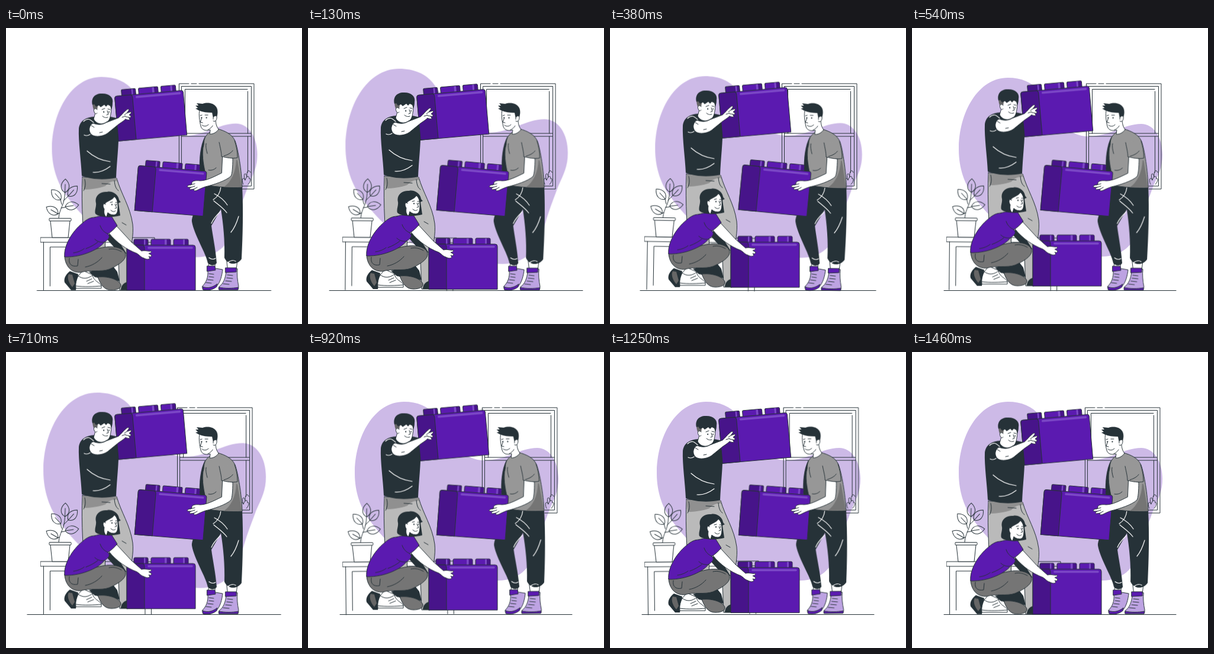
Animation, 500 px wide and 500 px high, one loop 1500 ms. Source, as an HTML page:

```html
<!DOCTYPE html>
<html lang="en">
<head>
<meta charset="utf-8">
<title>Building together</title>
<style>
  html, body { margin: 0; width: 100%; height: 100%; overflow: hidden; background: #fff; }
  svg { display: block; width: 100vw; height: 100vh; }
  svg * { transform-box: view-box; }
  .ink { fill: none; stroke: #263238; stroke-width: 1; stroke-linecap: round; stroke-linejoin: round; }
  .chalk { fill: none; stroke: #fff; stroke-width: 1.2; stroke-linecap: round; }
  .dark { fill: #263238; }
  .skin { fill: #fff; }
  .main { fill: #5b1ab0; }
  .deep { fill: #47148a; }
  .glow { fill: #7c48c7; }
  .line { stroke: #263238; stroke-width: 1; stroke-linejoin: round; stroke-linecap: round; }
  .shine { fill: none; stroke: #7c48c7; stroke-width: 3.6; stroke-linecap: round; }
  #blob { fill: #cdbae7; transform-origin: 250px 250px; }
  #floor { transform-origin: 250px 443.5px; }
  #desk { transform-origin: 155px 349px; }
  #right { transform-origin: 308px 285px; }
</style>
</head>
<body>
<svg viewBox="0 0 500 500">
  <defs>
    <g id="brick">
      <path class="deep line" d="M12 1V-8Q12-10 14-10H34Q36-10 36-8V1Z"/>
      <path class="main line" d="M41 1V-8Q41-10 43-10H72Q74-10 74-8V1ZM79 1V-8Q79-10 81-10H102Q104-10 104-8V1Z"/>
      <path class="deep" d="M67.500 0V-9.500H72Q73.500-9 73.500-8V0ZM98 0V-9.500H102Q103.500-9 103.500-8V0Z"/>
      <path class="glow" d="M29-9.500H31.500V0H29ZM64-9.500H67.500V0H64ZM95-9.500H98V0H95Z"/>
      <path class="main line" d="M0 76V4Q0 0 4 0H112Q116 0 116 4V76Z"/>
      <path class="deep line" d="M0 76V4Q0 0 4 0H27Q30 1 30 5V76Z"/>
      <path class="shine" d="M37 4.500H110"/>
    </g>
    <path id="leaf" d="M0 0C-9-5-9-15 0-23C9-15 9-5 0 0ZM0 0V-14"/>
  </defs>

  <path id="blob" d="M162 84C112 84 79 142 79 205C79 237 89 264 104 284C126 314 155 345 200 362C240 378 285 386 322 386C354 386 376 366 385 335C393 304 399 291 408 266C417 246 423 235 423 214C423 184 408 162 387 162C358 162 335 183 298 183C255 183 240 140 215 107C204 92 185 84 162 84Z"/>
  <path id="floor" class="ink" d="M54 443.500H446"/>

  <g id="window" class="ink">
    <path d="M292.500 272V94H309M313 94H322M326 94H419V272H398"/>
    <path d="M296.500 240V98.500H414.500V267H398M302.500 178V103.500H408M408.500 107V178M297 178H414M297 183H414M408.500 183V244"/>
    <path d="M401 264C397 256 401 250 404 257C400 247 405 241 407 252C406 241 411 238 413 244M404 257C407 249 411 249 411 255C414 252 414 260 409 264"/>
  </g>

  <g id="desk" class="ink">
    <path d="M58.500 354H251V362H58.500ZM63.500 362V443M74.500 436V370H100M235 443V370M245.500 443V362"/>
    <path d="M89 321C90 305 99 300 99.500 278M90 313L87 314M94 298L92 290M97 292L105 284M93 304L100 303"/>
    <use href="#leaf" transform="translate(99.500 278) rotate(2)"/>
    <use href="#leaf" transform="translate(92.500 290) rotate(-43)"/>
    <use href="#leaf" transform="translate(105 284) rotate(42)"/>
    <use href="#leaf" transform="translate(100 302) rotate(82)"/>
    <use href="#leaf" transform="translate(88 314) rotate(-60)"/>
    <path class="skin" d="M75 326L78 354H105L108 326Z"/>
    <rect class="skin" x="73" y="321.500" width="37" height="4.500" rx="1"/>
  </g>

  <g id="left">
    <!-- standing builder -->
    <path class="line" fill="#bababa" d="M129 252L187 254C194 280 210 302 214 332C216 350 211 370 209 385L206 443H192L188 345L168 330L167 400H136C130 350 127 300 129 252Z"/>
    <path fill="#909090" d="M129 253L187 254L188 259C178 258 173 262 168 267C157 271 143 273 131 273Z"/>
    <path class="ink" d="M133 256C135 264 134 270 131 275M183 258C184 268 186 272 190 275M162 263L176 264M196 329L203 333"/>
    <path class="dark" d="M194 443C194 436 198 431 205 429V443Z"/>
    <path class="dark" d="M149 150C136 151 125 156 123 170C122 192 127 225 128 250C146 257 170 257 186 253C187 225 191 195 190 176V153L176 150C168 160 155 160 149 150Z"/>
    <path class="skin line" d="M152 128C152 142 150 147 148 154C152 162 162 165 170 159C176 157 178 146 178 129Z"/>
    <path fill="#666" d="M146 124C146 132 147 138 150 140L154 139L155 132L160 126Z"/>
    <path class="dark" d="M146 130C143 118 151 110 163 111C175 111 182 118 180 127C180 132 179 135 178 138L176 132L172 130L169 133L166 130L160 134L157 131L152 133L149 129Z"/>
    <path class="skin line" d="M154 138C150 134 147 138 149 142C150 145 152 146 154 144"/>
    <path class="ink" d="M162 138L167 136M172 137L176 138M171 140L173 146L170 147M163 149C166 152 169 152 172 151"/>
    <path class="dark" d="M164.200 142a1 1.200 0 1 0 2 0a1 1.200 0 1 0-2 0M173.300 142a.8 1.200 0 1 0 1.600 0a.8 1.200 0 1 0-1.600 0"/>
    <path class="chalk" d="M137 208C148 218 160 224 176 226M147 244C158 245 168 240 176 234M131 158C138 152 142 154 148 160M132 181C136 183 139 182 142 180"/>
    <use href="#brick" transform="translate(183.500 115.500) rotate(-5)"/>
    <path class="skin line" d="M147 161C157 165 164 163 169 160L190 152C195 148 198 143 202 140C206 136 209 137 207 140L204 144L210 142C213 142 212 144 208 147L211 149C212 151 209 152 207 151L209 154C209 156 206 156 202 154C198 158 194 160 190 163L174 176C167 183 151 186 144 180C138 173 141 164 147 161Z"/>
    <path class="ink" d="M196 151L202 149M204 144L200 147M207 151L202 150M144 165L149 168M158 177L163 176"/>

    <use href="#brick" transform="translate(204 367)"/>

    <!-- kneeling builder -->
    <path class="dark" d="M166 352L178 347L194 366L204 382L184 372Z"/>
    <path class="dark" d="M108 411C102 416 97 422 99 430L110 443H118L122 416Z"/>
    <path fill="#666" d="M106 416C103 421 105 430 112 438L116 432L112 417Z"/>
    <path class="dark" d="M140 412L181 403L188 412L192 428L166 424L150 421Z"/>
    <path class="line" fill="#757575" d="M155 421C170 419 190 424 194 434C195 440 187 443 178 443C166 443 160 434 155 421Z"/>
    <path class="skin line" d="M122 419L130 410L146 417C147 427 158 430 161 435V440H118C117 432 119 425 122 419Z"/>
    <path class="ink" d="M118 436C132 438 148 437 161 436M136 428L145 424M138 432L148 428M122 419C130 425 138 424 146 418"/>
    <path class="line" fill="#757575" d="M99 386C120 386 145 374 163 371C184 367 201 373 202 383C203 392 190 401 174 408C160 413 142 408 126 413C110 414 100 402 99 386Z"/>
    <path class="ink" d="M107 389C105 400 112 404 121 402L122 391M162 388C155 396 145 402 134 404M174 374C182 372 190 375 195 378"/>
    <path class="main line" d="M150 320C160 317 172 316 178 318L188 334C182 341 177 345 172 348C178 354 171 359 166 362C160 372 130 388 99 387C97 370 110 345 130 329C137 323 143 320 150 320Z"/>
    <path class="ink" d="M172 348C165 345 161 340 159 334M135 373C143 370 150 366 155 362M166 362C160 363 154 361 150 357M114 380C122 379 128 376 132 373"/>
    <path class="dark" d="M152 296C149 284 159 276 171 277C178 275 187 280 190 287C191 291 192 293 194 294L190 296L193 317C182 320 160 322 151 314C149 309 153 302 152 296Z"/>
    <path class="skin line" d="M167 297C171 292 180 291 183 285C188 289 189 296 189 302C189 309 188 316 182 316C177 316 174 314 172 312L170 319C166 318 165 312 166 306C162 300 165 295 168 298Z"/>
    <path class="ink" d="M176 295L180 294M185 295L188 295M184 298L187 304L184 305M177 308C180 311 183 311 185 309"/>
    <path class="dark" d="M178 298.500a1 1.200 0 1 0 2 0a1 1.200 0 1 0-2 0M185.700 298.500a.8 1.200 0 1 0 1.600 0a.8 1.200 0 1 0-1.600 0"/>
    <path class="skin line" d="M187 335L212 362L229 377C235 375 239 378 245 377C247 379 243 381 241 381L246 384C246 387 243 387 241 386L243 389C241 392 237 391 233 389C228 388 225 383 221 381C203 374 187 363 174 347C178 344 183 340 187 335Z"/>
  </g>

  <g id="right">
    <path class="skin line" d="M343 396H354L352 407H342ZM373 392H391L389 408H375Z"/>
    <path class="line" fill="#bda3e2" d="M341 409C342 422 338 430 332 436L333 442C342 444 350 442 356 436C362 430 365 418 366 408L354 406Z"/>
    <path class="line" fill="#bda3e2" d="M372 411C371 423 367 432 360 437L360 442H392L393 436C391 426 390 416 391 407Z"/>
    <path class="main line" d="M340 402L353 402L354 409L340 411ZM371 405L389 405L389 412L371 413ZM332 437C342 441 351 437 357 432L356 437C350 442 342 444 333 442ZM360 438C370 440 382 440 393 438L392 442H360Z"/>
    <path class="ink" d="M343 415L351 416M343 420L351 421M341 425L350 426M338 430L347 431M374 417L383 418M373 422L383 423M371 427L381 428M367 432L377 433"/>
    <path class="dark" d="M338 262C331 285 313 315 314 327C318 350 338 380 341 397C346 402 352 402 356 397C354 372 349 350 347 334L363 306C367 330 370 360 369 388C374 400 390 402 398 390C400 350 401 310 399 266Z"/>
    <path class="chalk" d="M352 280C360 284 368 290 374 299M351 292C358 298 367 304 373 312M363 268C362 278 358 285 350 290M380 345C386 338 390 328 393 318M347 330C350 322 357 315 362 310M343 388C347 391 351 391 354 389M375 396C380 392 385 392 388 394"/>
    <path class="dark" d="M336 183C328 198 326 220 327 242L340 246L338 195Z"/>
    <path class="line" fill="#979797" d="M344 176C337 181 334 187 334 197C330 210 333 230 337 246V265C358 269 380 270 399 269C398 240 392 205 387 191C382 179 370 174 357 170Z"/>
    <path fill="#757575" d="M391 224L398.500 268.500L368 268.500C380 260 388 245 389 222Z"/>
    <path class="skin line" d="M327 138C325 146 327 158 329 166C331 173 338 174 345 172L344 179C349 180 356 176 359 171C355 166 354 160 354 154L350 138Z"/>
    <path class="dark" d="M325 139L320 136L324 135L320 131L325 131L322 127L332 128C340 125 349 127 353 131C359 136 358 146 355 153L350 153L348 143C340 143 332 142 325 139Z"/>
    <path class="skin line" d="M350 154C349 148 356 146 356 151C356 156 353 159 350 157"/>
    <path class="ink" d="M328 148L331 147M336 147L341 147M331 151L328 159L332 160M331 164C335 167 339 166 342 163M341 172C345 170 347 168 349 165"/>
    <path class="dark" d="M329.200 151.500a.8 1.200 0 1 0 1.600 0a.8 1.200 0 1 0-1.600 0M337.500 151.500a1 1.200 0 1 0 2 0a1 1.200 0 1 0-2 0"/>
    <use href="#brick" transform="translate(223.500 232.500) rotate(4.700)"/>
    <path class="skin line" d="M366 216L383 220C383 235 382 246 380 250C372 258 350 265 337 268C331 270 327 272 323 274C319 276 316 275 318 272L312 273C309 273 310 270 313 269L307 269C305 267 308 265 312 265L314 263C313 259 318 257 328 258C338 258 350 252 364 245Z"/>
    <path class="ink" d="M313 269L319 267M318 272L323 269M312 265L319 263"/>
    <path class="line" fill="#979797" d="M360 193C362 203 364 210 364 217C373 219 382 221 391 219C391 208 389 199 386 190"/>
    <path class="ink" d="M368 216C375 214 380 211 383 207M340 212C338 205 337 200 338 195M342 240C348 241 352 239 355 236"/>
  </g>
</svg>
<script>
  const loop = 1500;
  // steps: [position in the loop, value]
  const beat = [[0, 1], [8, 1], [164, 1.1], [446, 1], [592, 1], [742, 1.1], [892, 1], [1500, 1]];
  const sway = [[0, 0], [375, 1], [1125, -1], [1500, 0]];
  const lift = [[0, 0], [750, -10], [1500, 0]];
  const shake = [0, -1, 2, -4, 4, -4, 4, -4, 2, -1, 0].map((x, i) => [i * 150, x]);

  const move = (id, steps, toTransform) =>
    document.getElementById(id).animate(
      steps.map(([at, v]) => ({ offset: at / loop, transform: toTransform(v) })),
      { duration: loop, iterations: Infinity, delay: -20 }
    );

  move('blob', beat, v => `scale(${v})`);
  move('floor', beat, v => `scaleX(${v})`);
  move('desk', sway, v => `rotate(${v}deg)`);
  move('right', sway, v => `rotate(${v}deg)`);
  move('left', lift, v => `translateY(${v}px)`);
  move('window', shake, v => `translateX(${v}px)`);
</script>
</body>
</html>
```
